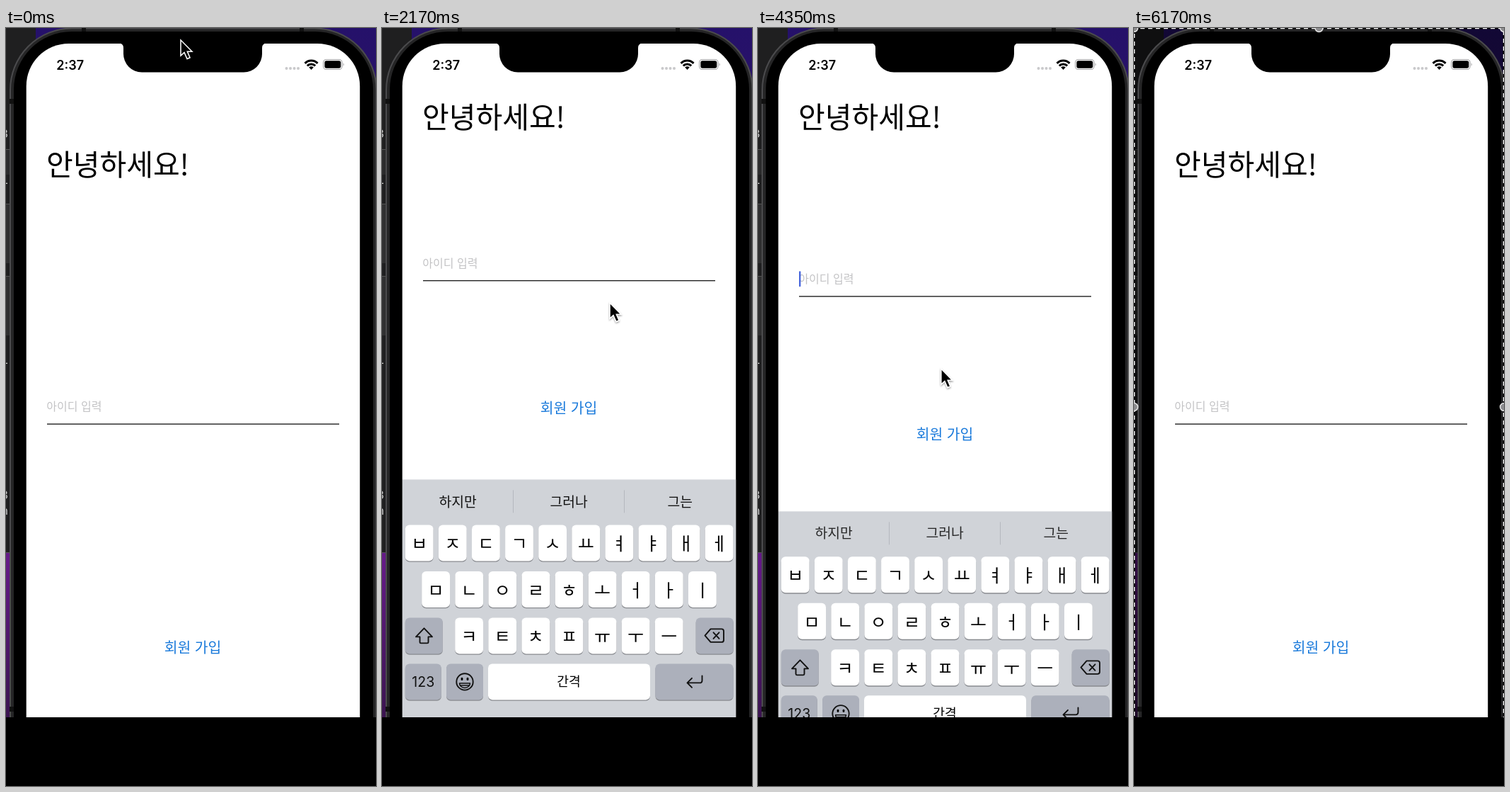
An HTML page for the animation above (6260 ms loop, 523x1070 px).

```html
<!DOCTYPE html>
<html lang="ko">
<head>
<meta charset="utf-8">
<title>Login screen with keyboard</title>
<style>
  html, body { margin: 0; width: 100%; height: 100%; overflow: hidden; background: #000; }
  svg { display: block; }
  text { font-family: "Noto Sans CJK KR", "Noto Sans CJK", sans-serif; white-space: pre; }
  .ko { font-weight: 350; }
  .ui { font-family: Inter, "Noto Sans", sans-serif; }
  .icon { fill: none; stroke: #111; stroke-width: 1.9; stroke-linecap: round; stroke-linejoin: round; }
</style>
</head>
<body>
<svg id="stage" width="523" height="1070" viewBox="0 0 523 1070"></svg>
<script>
const LOOP = 6260;
const words = ['하지만', '그러나', '그는'];

const rect = (x, y, w, h, fill, rx = 0, extra = '') =>
  `<rect x="${x}" y="${y}" width="${w}" height="${h}" rx="${rx}" fill="${fill}" ${extra}/>`;

// Text whose glyphs are centred vertically on cy.
const label = (s, x, cy, size, fill = '#000', anchor = 'start', extra = 'class="ko"') =>
  `<text x="${x}" y="${cy + size * .37}" font-size="${size}" fill="${fill}" text-anchor="${anchor}" ${extra}>${s}</text>`;

const key = (x, y, w, fill = '#fff') =>
  rect(x, y + 1.3, w, 51, '#898b90', 6) + rect(x, y, w, 51, fill, 6);

const keyRow = (chars, x0, y) => [...chars].map((c, i) => {
  const x = x0 + i * 47.1;
  return key(x, y, 39.8) + label(c, x + 19.9, y + 26.5, 25, '#000', 'middle', '');
}).join('');

function backdrop() {
  const edge = y => rect(0, y, 6, 1, '#555');
  return rect(0, 0, 523, 973, 'url(#violet)') +
    rect(0, 0, 42, 740, '#1f1f20') +
    rect(0, 171, 6, 36, '#2b2b2c') + rect(0, 248, 6, 84, '#303031') + rect(0, 350, 6, 84, '#303031') +
    [171, 248, 350, 740].map(edge).join('') +
    [['3', 149], ['-', 218], ['-', 472], ['3', 659], ['n', 681]].map(([s, y]) =>
      label(s, 3, y, 16, '#ccc', 'end', 'class="ui"')).join('');
}

function phone() {
  const band = (x, y, w, h) => rect(x, y, w, h, '#111');
  return rect(6, .5, 517.5, 1100, '#252526', 87, 'stroke="#4b4b4d" stroke-width="2"') +
    band(107, 0, 6, 5) + band(415, 0, 6, 5) + band(5, 100, 6, 7) + band(5, 958, 6, 7) +
    rect(11, 5, 508, 1100, '#000', 82) +
    rect(28.7, 22, 471.5, 1019, '#fff', 60) +
    '<path d="M160 21.500q6 .5 6 6.500V36a26 26 0 0 0 26 26.500H336a26 26 0 0 0 26-26.500V28q0-6 6-6.500Z"/>';
}

function statusBar() {
  const dots = [396.5, 402, 407.5, 413].map(x => `<circle cx="${x}" cy="57" r="2" fill="#c9c9cb"/>`).join('');
  return '<text class="ui" x="71.300" y="58.500" font-size="18" font-weight="600">2:37</text>' + dots +
    `<g transform="translate(0 -.6)">
      <path d="M422.500 50.500a12.500 12.500 0 0 1 18 0M425.800 54a8 8 0 0 1 11.400 0" fill="none" stroke="#000" stroke-width="3"/>
      <path d="M431.500 59.500l-3.300-3.400a4.700 4.700 0 0 1 6.600 0Z"/>
    </g>` +
    rect(448.5, 44.5, 26.5, 14, 'none', 4.3, 'stroke="#a5a5a7" stroke-width="1.1"') +
    rect(450.3, 46.3, 23, 10.4, '#000', 2.6) +
    '<path d="M476.600 49.200a3 3 0 0 1 0 4.600Z" fill="#a5a5a7"/>';
}

function keyboard() {
  const grey = '#acb0bb';
  return rect(29, 637, 471.2, 410, '#d0d3d8') +
    rect(185, 652, 1, 32, '#b5b8be') + rect(342, 652, 1, 32, '#b5b8be') +
    [80.5, 237.5, 403.5].map((x, i) => label(words[i], x, 668, 19.3, '#111', 'start', 'class="ko word"')).join('') +
    keyRow('ㅂㅈㄷㄱㅅㅛㅕㅑㅐㅔ', 32.8, 701) +
    keyRow('ㅁㄴㅇㄹㅎㅗㅓㅏㅣ', 56.2, 766.5) +
    keyRow('ㅋㅌㅊㅍㅠㅜㅡ', 103.2, 832) +
    key(32.8, 832, 53, grey) + key(443.7, 832, 53, grey) +
    key(32.8, 897, 51, grey) + key(91, 897, 52, grey) + key(150, 897, 229, '#fff') + key(386.5, 897, 110, grey) +
    label('123', 58.3, 922.5, 19.5, '#111', 'middle', 'class="ui"') +
    label('간격', 264, 921.5, 18.2, '#000', 'middle') +
    `<g class="icon">
      <path d="M59.500 847L71 859H65.500V866.500q0 1.500-1.500 1.500H55q-1.500 0-1.500-1.500V859H48Z"/>
      <path d="M464.500 848H480q3 0 3 3V863.500q0 3-3 3H464.500L456.500 857.200ZM468.500 853l8 8.500m0-8.500l-8 8.500"/>
      <path d="M452.500 914v6.500q0 3.500-3.500 3.500H431.500M438 917.500l-6.500 6.500 6.500 6.500"/>
      <circle cx="117" cy="922.500" r="11.700"/>
      <path d="M109.500 924.500h15a7.500 6.500 0 0 1-15 0ZM111 927.500h12" stroke-width="1.500"/>
    </g>
    <ellipse cx="113" cy="918.500" rx="1.500" ry="2.200"/><ellipse cx="121" cy="918.500" rx="1.500" ry="2.200"/>`;
}

function selection() {
  const handle = ([x, y]) => `<circle cx="${x}" cy="${y}" r="5.500" fill="#8e8e90" stroke="#e4e4e4" stroke-width="1.500"/>`;
  const border = 'M.5 1070V.5H522.500V1070';
  return `<path d="${border}" fill="none" stroke="#000" stroke-width="2"/>
    <path d="${border}" fill="none" stroke="#fff" stroke-width="1.500" stroke-dasharray="6 5"/>` +
    [[0, 0], [261.5, 0], [523, 0], [0, 535], [523, 535]].map(handle).join('');
}

const $ = id => document.getElementById(id);
$('stage').innerHTML = `
  <defs>
    <linearGradient id="violet" x1="0" y1="0" x2="0" y2="1">
      <stop offset="0" stop-color="#25116a"/><stop offset=".5" stop-color="#35145f"/>
      <stop offset=".77" stop-color="#651b88"/><stop offset="1" stop-color="#3b1450"/>
    </linearGradient>
    <filter id="shade" x="-50%" y="-50%" width="200%" height="200%">
      <feDropShadow dx="0" dy="1.500" stdDeviation="1.300" flood-opacity=".4"/>
    </filter>
  </defs>
  ${backdrop()}
  <g id="dim">${rect(0, 0, 523, 973, '#000', 0, 'opacity=".5"')}</g>
  ${phone()}${statusBar()}
  <g id="title">${label('안녕하세요!', 57, 193, 41)}</g>
  <g id="field">
    ${label('아이디 입력', 57.3, 534.5, 16, '#c3c3c5')}
    ${rect(58, 558.4, 413, 1.4, '#222')}
    <g id="caret">${rect(58, 523.5, 2.4, 22, '#4a68dc', 1)}</g>
  </g>
  <g id="button">${label('회원 가입', 264, 874.5, 20.4, '#1a7adb', 'middle')}</g>
  <g id="keys">${keyboard()}</g>
  <g id="select">${selection()}</g>
  ${rect(0, 973, 523, 97, '#000')}
  <path id="pointer" d="M0 0V22L5 17.500 9 26.500 13 24.800 9.300 16.300H16Z" stroke="#fff" stroke-width="1.500" filter="url(#shade)"/>`;

const wordEls = [...document.querySelectorAll('.word')];

// Each session: layout rises, keyboard rises, layout falls, keyboard falls (ms).
const sessions = [
  { up: 1546, keysUp: 1455, down: 2929, keysDown: 2902 },
  { up: 4063, keysUp: 4063, down: 4885, keysDown: 4885 }
];
const SELECT_AT = 5440;

// Pointer stops: time, x, y.
const path = [
  [0, 247, 17], [40, 247, 17], [610, 320, 575], [700, 320, 575], [1130, 340, 487], [1570, 340, 487],
  [1800, 365, 405], [2170, 322, 388], [2500, 372, 410], [2830, 300, 378], [3090, 258, 384],
  [3500, 278, 380], [3910, 233, 514], [4090, 233, 514], [4740, 306, 421], [4910, 306, 421],
  [5520, 325, 433], [5700, -25, 550], [LOOP, -25, 550]
];

// Critically damped spring from 0 to 1.
function spring(ms) {
  const x = Math.max(0, ms) * .013;
  return 1 - (1 + x) * Math.exp(-x);
}

function pointerAt(t) {
  const i = path.findIndex(p => p[0] > t);
  const [t0, x0, y0] = path[i - 1], [t1, x1, y1] = path[i];
  const u = (t - t0) / (t1 - t0), e = u * u * (3 - 2 * u);
  return [x0 + (x1 - x0) * e, y0 + (y1 - y0) * e];
}

const move = (id, x, y) => $(id).setAttribute('transform', `translate(${x} ${y})`);
const show = (id, on) => $(id).setAttribute('visibility', on ? 'visible' : 'hidden');

function draw(t) {
  const s = sessions[t < 3800 ? 0 : 1];
  const lift = spring(t - s.up) - spring(t - s.down);
  const rise = t < s.up ? 0 : spring(t - s.keysUp) - spring(t - s.keysDown);
  const editing = t >= s.up && t < s.down;
  const closing = t >= s.keysDown;

  move('title', 0, editing ? -67 : 0);
  move('field', 0, -203 * lift);
  move('button', 0, -339 * lift);
  move('keys', 0, 404 * (1 - rise));
  show('caret', editing && (t - s.up) % 1000 < 620);
  wordEls.forEach((el, i) => {
    el.textContent = closing ? words[i][0] : words[i];
    el.setAttribute('opacity', closing ? rise * (.6 - i * .2) : rise);
  });

  show('dim', t >= SELECT_AT);
  show('select', t >= SELECT_AT);
  move('pointer', ...pointerAt(t));
}

const start = performance.now();
function tick() {
  draw((performance.now() - start) % LOOP);
  requestAnimationFrame(tick);
}
tick();
</script>
</body>
</html>
```
